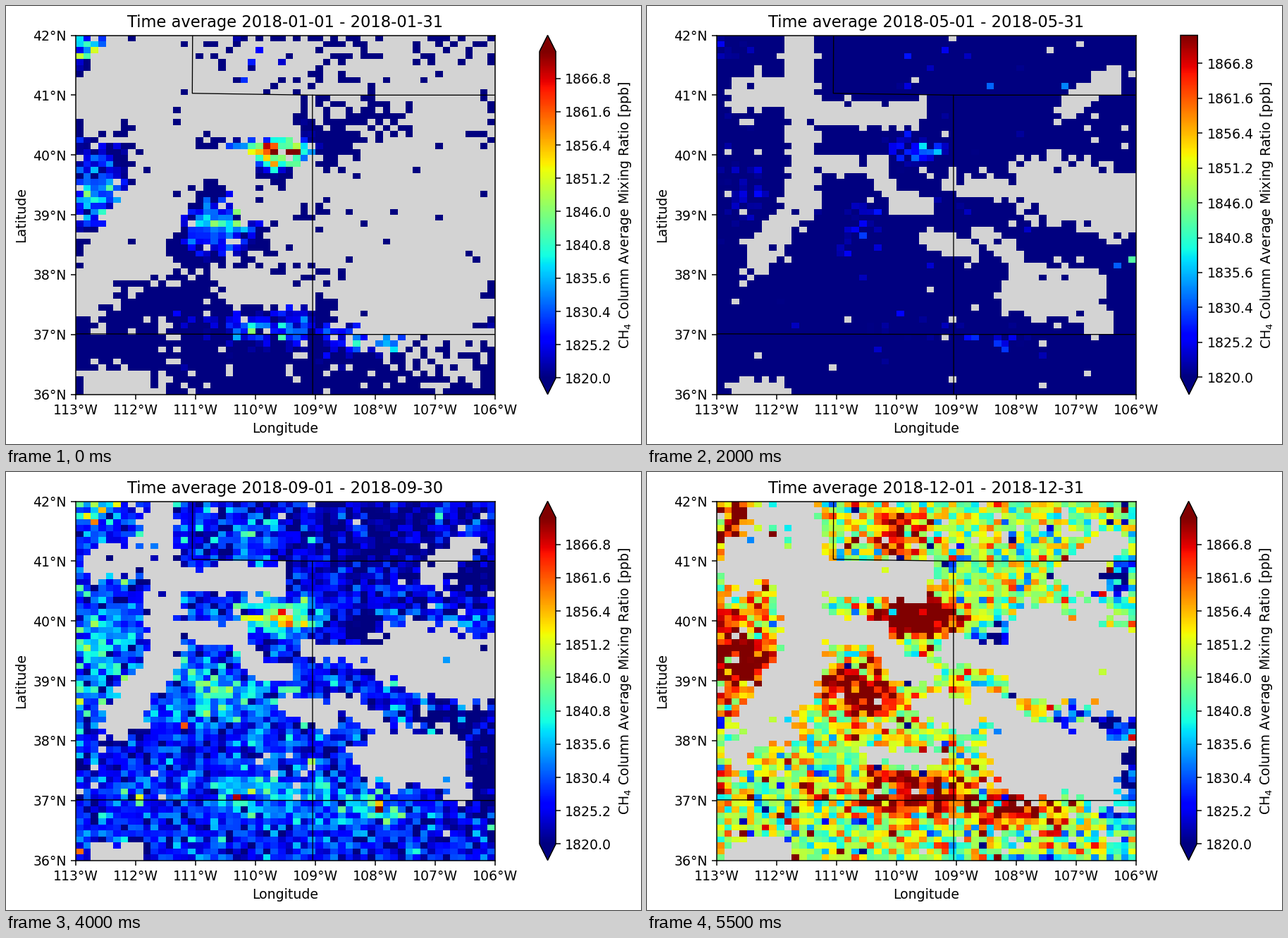
Recreate the animation shown at these times as a matplotlib script. Size 901 by 621 pixels, loop 6000 ms.

```python
import numpy as np
import matplotlib.pyplot as plt
from matplotlib.animation import FuncAnimation

W, H, DPI = 901, 621, 136
COLS, ROWS = 56, 60
TICKS = 1820 + 5.2 * np.arange(10)

plt.rcParams["font.family"] = "DejaVu Sans"

# Map coordinates: degrees east of 113°W, and latitude.
x_edges = np.linspace(0, 7, COLS + 1)
y_edges = np.linspace(36, 42, ROWS + 1)
X, Y = np.meshgrid((x_edges[:-1] + x_edges[1:]) / 2, (y_edges[:-1] + y_edges[1:]) / 2)

# Ridge lines (half width, points): the higher the ground, the longer it has no data.
MOUNTAINS = [
    (0.38, [(0.4, 41), (1.4, 41.05), (1.35, 42)]),
    (0.32, [(1.4, 41), (1.4, 40.7), (3.3, 40.7)]),
    (0.38, [(1.4, 40.7), (1.5, 39.4), (0.7, 38.3)]),
    (0.22, [(1.6, 39.85), (2.7, 39.8), (3, 39.2), (3.5, 39.15)]),
    (0.22, [(3.9, 39.5), (5, 39.4)]),
    (0.25, [(3.6, 38.6), (4.2, 38.4)]),
    (0.22, [(4.4, 38.7), (5, 38.3)]),
    (0.78, [(5.5, 39.45), (6.9, 39.15)]),
    (0.62, [(5.1, 37.75), (6.1, 37.7)]),
    (0.35, [(6.1, 37.6), (6.4, 37.2)]),
    (0.25, [(0.4, 36.1), (1, 36.1)]),
    (0.25, [(5.9, 40.8), (6.6, 41.3)]),
]
HILLS = [
    (0.3, [(0.3, 37.6), (0.4, 38.1), (1.3, 38.2)]),
    (0.25, [(2.6, 37.8), (3.6, 37.7)]),
    (0.6, [(6.2, 40.8), (6.2, 40.1)]),
    (0.4, [(0.5, 40.7), (0.8, 41.7)]),
]
PLAINS = [
    (0.9, [(2.2, 41.6), (6.5, 41.4)]),
    (1.1, [(6.1, 40.5), (6.1, 37.1)]),
    (0.8, [(4.6, 39.2), (5, 38)]),
    (0.5, [(2.8, 38), (4.2, 37.9)]),
]

# Basins that hold methane or stay clean: x, latitude, radii, strength.
BASINS = [
    (3.35, 40.05, 0.6, 0.25, 66),
    (0.3, 39.4, 0.6, 0.8, 26),
    (2.4, 38.8, 0.7, 0.5, 27),
    (3.2, 37.1, 1.1, 0.35, 23),
    (4.9, 36.9, 0.6, 0.25, 28),
    (3.0, 41.5, 0.5, 0.35, 22),
    (0.2, 41.8, 0.4, 0.3, 32),
    (6.8, 37.4, 0.4, 0.9, -25),
    (4.8, 39.75, 0.6, 0.25, -30),
    (6.2, 38.3, 0.6, 0.2, -28),
    (6.6, 40.8, 0.5, 0.4, -20),
]


def blob(x, y, rx, ry):
    return np.exp(-((X - x) / rx) ** 2 - ((Y - y) / ry) ** 2)


def distance(a, b):
    """Distance of each cell from the segment a-b."""
    dx, dy = b[0] - a[0], b[1] - a[1]
    t = np.clip(((X - a[0]) * dx + (Y - a[1]) * dy) / (dx**2 + dy**2), 0, 1)
    return np.hypot(X - a[0] - t * dx, Y - a[1] - t * dy)


def ground(chains, height):
    return height * np.max([np.exp(-(distance(a, b) / width) ** 2)
                            for width, chain in chains
                            for a, b in zip(chain, chain[1:])], axis=0)


rough = np.random.default_rng(4).normal(0, 0.08, X.shape)
terrain = rough + np.max([ground(MOUNTAINS, 1), ground(HILLS, 0.5),
                          ground(PLAINS, 0.25)], axis=0)
sources = sum(strength * blob(*place) for *place, strength in BASINS)
northeast_lag = 0.45 * blob(5, 41.5, 2, 1)


def field(month):
    """Mixing ratio of one month, masked where snow or terrain hides it."""
    rng = np.random.default_rng(month)
    base = np.interp(month - northeast_lag, [1, 8, 9, 10, 12],
                     [1811, 1813, 1827, 1846, 1848])
    winter = (1 + np.cos(2 * np.pi * month / 12)) / 2
    plume = (0.25 + 0.75 * winter**2) * sources
    spread = 2.5 + (base - 1811) / 8 + 0.15 * np.abs(plume)
    snow_line = np.interp(month, [1, 3, 5, 9, 10, 12],
                          [0.15, 0.37, 0.6, 0.58, 0.4, 0.37])
    hidden = terrain + rng.normal(0, 0.06, X.shape) > snow_line
    strays = rng.random(X.shape) < 0.015
    level = base + plume + spread * rng.standard_t(5, X.shape)
    return np.ma.array(level, mask=hidden ^ strays)


fields = [field(month) for month in range(1, 13)]

fig = plt.figure(figsize=(W / DPI, H / DPI), dpi=DPI, facecolor="white")


def pixel_axes(left, width):
    return fig.add_axes([left / W, 70.5 / H, width / W, 509 / H])


ax = pixel_axes(99, 595)
ax.set_facecolor("lightgray")
mesh = ax.pcolormesh(x_edges, y_edges, fields[0], cmap="jet", vmin=1820, vmax=1871)
borders = [([1.95, 1.945, 3.95, 7], [42, 41.03, 41, 41]),
           ([3.95, 3.955], [41, 36]),
           ([0, 3.95, 7], [37.01, 37, 37])]
for xs, ys in borders:
    ax.plot(xs, ys, color="black", lw=0.7)
ax.set(xlim=(0, 7), ylim=(36, 42), xlabel="Longitude", ylabel="Latitude")
ax.set_xticks(range(8), [f"{113 - i}°W" for i in range(8)])
ax.set_yticks(range(36, 43), [f"{lat}°N" for lat in range(36, 43)])
title = ax.set_title("")


def add_bar(width, extend, label_y):
    cax = pixel_axes(757, width)
    bar = fig.colorbar(mesh, cax=cax, extend=extend, ticks=TICKS, format="%.1f")
    bar.set_label("CH$_4$ Column Average Mixing Ratio [ppb]")
    cax.yaxis.label.set_y(label_y)
    return cax


open_bar = add_bar(23.1, "both", 0.5)
capped_bar = add_bar(24.2, "min", 0.475)


def update(i):
    month = i + 1
    last_day = 28 if month == 2 else 30 + (month + month // 8) % 2
    mesh.set_array(fields[i])
    title.set_text(f"Time average 2018-{month:02d}-01 - 2018-{month:02d}-{last_day}")
    capped = month in (5, 7)
    capped_bar.set_visible(capped)
    open_bar.set_visible(not capped)
    return mesh, title


anim = FuncAnimation(fig, update, frames=12, interval=500, repeat=True,
                     repeat_delay=0, init_func=lambda: update(0))
plt.show()
```
